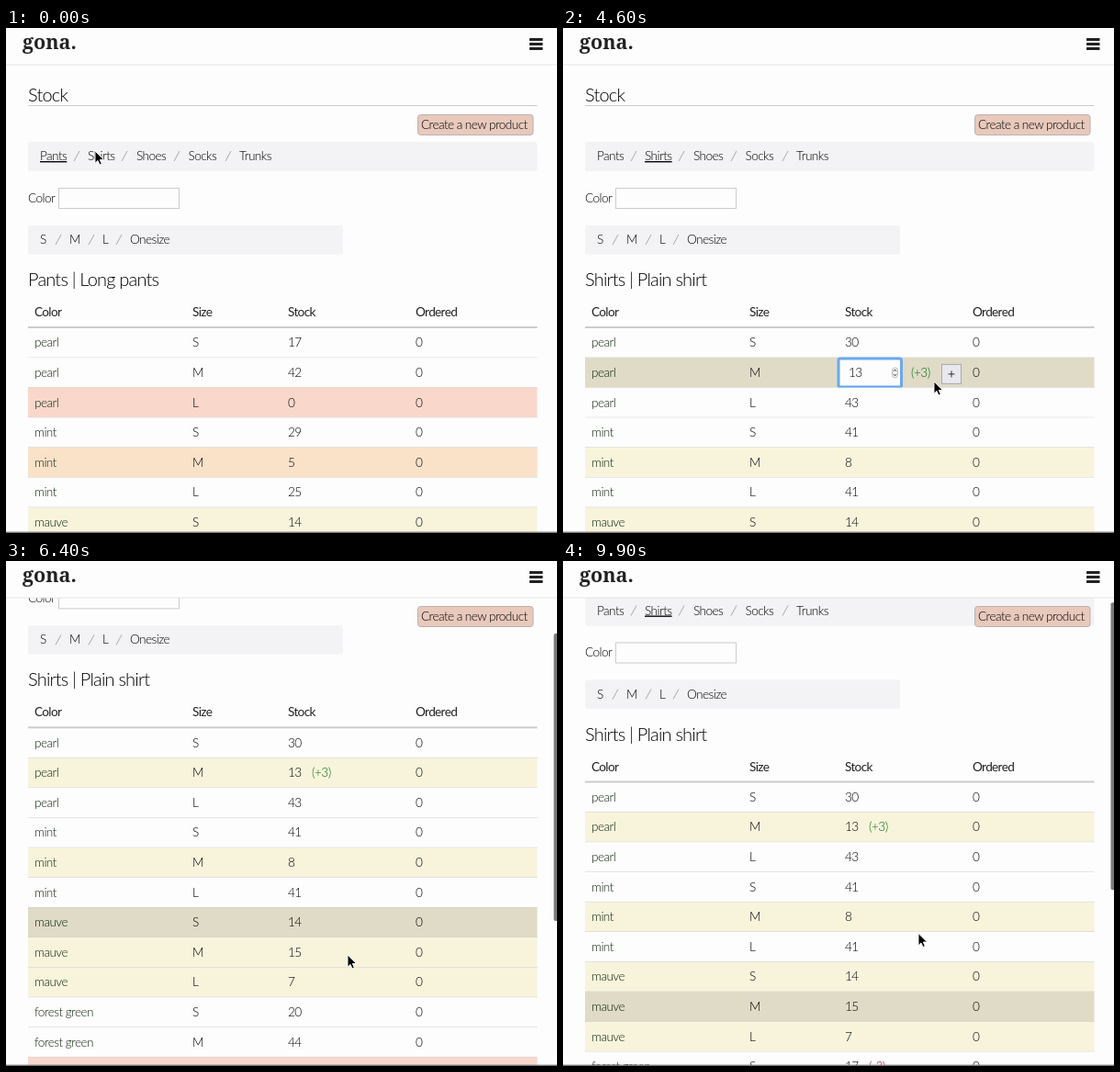
An HTML page for the animation above (10000 ms loop, 600 px wide and 550 px high).

```html
<!DOCTYPE html>
<html lang="en">
<head>
<meta charset="utf-8">
<title>Stock</title>
<style>
  html, body { margin: 0; width: 100%; height: 100%; overflow: hidden; background: #fefdfe; }
  svg { display: block; }
  text { font: 300 13.6px Lato, "Open Sans", sans-serif; letter-spacing: -.55px; fill: #000; white-space: pre; }
  .big { font-size: 20px; letter-spacing: -.8px; }
  .head { font-weight: 400; fill: #222; letter-spacing: -.65px; }
  .name { fill: #0c240c; }
  .on { text-decoration: underline; }
  .up { fill: #006a08; }
  .down { fill: #c00000; }
  .logo { font: 900 21.5px "Noto Serif", serif; letter-spacing: 0; fill: #222; }
</style>
</head>
<body>
<svg id="stage" width="600" height="550" viewBox="0 0 600 550"></svg>
<script>
const LOOP = 10000, STEP = 100;
const ROW_TOP = 326.5, ROW_H = 32.6;
const COLORS = ['pearl', 'mint', 'mauve', 'forest green'];
const SIZES = ['S', 'M', 'L'];
const PANTS = [17, 42, 0, 29, 5, 25, 14, 20, 31, 18, 22, 9];
const SHIRTS = [30, 10, 43, 41, 8, 41, 14, 15, 7, 20, 44, 0];

// [time, value...]
const SCROLL = [[5500, 0], [6000, 103.5], [6100, 103.5], [6600, 152.5], [9400, 152.5], [9900, 85.5]];
const POINTER = [
  [400, 97, 134], [800, 101, 152], [1600, 101, 152], [2200, 321, 376],
  [2300, 321, 376], [2500, 321, 380], [2900, 321, 380], [3100, 361, 373],
  [4300, 361, 373], [4600, 404, 385], [4900, 424, 376], [5100, 424, 376],
  [5400, 372, 429], [6600, 372, 429], [7100, 316, 482], [7500, 316, 482],
  [7700, 361, 480], [8400, 361, 480], [8700, 417, 484], [8900, 417, 484], [9400, 387, 405.5]
];
const SHAPES = [[0, 'arrow'], [2200, 'beam'], [3100, 'arrow'], [4800, 'hand'], [5200, 'arrow'],
  [7100, 'beam'], [7600, 'arrow'], [8600, 'hand'], [9000, 'arrow']];
const EDITS = [
  { row: 1, open: 2700, focus: 3400, ticks: [3700, 3900, 4100], press: 5100, save: 5200, sign: 1 },
  { row: 9, open: 7400, focus: 7800, ticks: [8000, 8200, 8400], press: 8700, save: 8900, sign: -1 }
];

const stage = document.getElementById('stage');

function track(keys, t) {
  const i = keys.findIndex(k => k[0] > t);
  if (i === 0) return keys[0].slice(1);
  if (i < 0) return keys[keys.length - 1].slice(1);
  const a = keys[i - 1], b = keys[i];
  const u = 1 - (1 - (t - a[0]) / (b[0] - a[0])) ** 2;
  return a.slice(1).map((v, n) => v + (b[n + 1] - v) * u);
}

const text = (x, y, s, cls = '') => `<text x="${x}" y="${y}" class="${cls}">${s}</text>`;
const rect = (x, y, w, h, fill, more = '') =>
  `<rect x="${x}" y="${y}" width="${w}" height="${h}" fill="${fill}" ${more}/>`;
const path = (d, more) => `<path d="${d}" ${more}/>`;
const slash = (x, y) => path(`M${x - 3} ${y + 5}l6 -11`, 'stroke="#aaa" fill="none"');

function rowFill(stock, hover) {
  if (stock === 0) return hover ? '#e0bfb3' : '#f9d8cb';
  if (stock <= 5) return hover ? '#e1cab2' : '#fae2c9';
  if (stock <= 15) return hover ? '#dfdbc6' : '#f8f4dc';
  return hover ? '#f2f1f4' : '#fefdfe';
}

function editor(y, value, delta, label, focused, pressed) {
  const bx = delta > 0 ? 412.5 : delta < 0 ? 407.5 : 374;
  let out = rect(300.5, y - 15, 67, 30, '#fefdfe', 'stroke="#ccc"');
  if (focused) {
    out += rect(300, y - 15.5, 68.5, 31, 'none', 'stroke="#6ba8ee" stroke-width="3" rx="2"')
      + rect(358.5, y - 5.5, 6, 11, '#f6f6f6', 'stroke="#bbb" rx="3"')
      + path(`M360 ${y - 1.5}l1.5 -2 1.5 2M360 ${y + 1.5}l1.5 2 1.5 -2`, 'stroke="#444" fill="none"');
  }
  return out + text(311, y + 5, value) + label(379)
    + rect(bx, y - 9, 21, 21, pressed ? '#a09fa2' : '#e9e8ee', `stroke="${pressed ? '#999' : '#aaa'}"`)
    + path(`M${bx + 7} ${y + 1.5}h7m-3.5 -3.5v7`, 'stroke="#333" fill="none"');
}

function table(t, hover) {
  const stocks = t < 1300 ? PANTS : SHIRTS;
  let out = '';
  stocks.forEach((base, i) => {
    const top = ROW_TOP + i * ROW_H, mid = top + ROW_H / 2, y = mid + 4.5;
    const edit = EDITS.find(e => e.row === i && t >= e.open);
    const editing = edit && t < edit.save;
    const delta = edit ? edit.sign * edit.ticks.filter(k => t >= k).length : 0;
    const value = base + delta;
    const label = x => delta
      ? text(x, y, `(${delta > 0 ? '+' : ''}${delta})`, delta > 0 ? 'up' : 'down') : '';
    out += rect(24, top, 554.5, ROW_H, rowFill(editing ? base : value, i === hover))
      + rect(24, top + ROW_H - .5, 554.5, 1, '#d0cfd2')
      + text(31, y, COLORS[Math.floor(i / 3)], 'name') + text(203, y, SIZES[i % 3]) + text(446, y, 0);
    out += editing
      ? editor(mid, value, delta, label, t >= edit.focus && t < edit.press, t >= edit.press)
      : text(307, y, value) + label(333);
  });
  return out + rect(24, 325, 554.5, 2, '#ccc');
}

function page(t, hover) {
  const shirts = t >= 1300;
  const nav = [[37, 'Pants'], [89, 'Shirts'], [142, 'Shoes'], [198.5, 'Socks'], [254, 'Trunks']];
  const sizes = [[37, 'S'], [69, 'M'], [105, 'L'], [135, 'Onesize']];
  return text(24, 80, 'Stock', 'big') + rect(24, 84, 554.5, 1, '#ccc')
    + rect(24, 124, 554.5, 32, '#f3f2f4', 'rx="3"')
    + nav.map(([x, s], i) => text(x, 144, s, i === +shirts ? 'on' : '')).join('')
    + [77, 129, 186, 242].map(x => slash(x, 140)).join('')
    + text(24, 189.5, 'Color') + rect(57.5, 174.5, 131, 22, '#fefdfe', 'stroke="#ccc"')
    + rect(24, 215, 343, 31.5, '#f3f2f4', 'rx="3"')
    + sizes.map(([x, s]) => text(x, 235, s)).join('')
    + [57, 93, 123].map(x => slash(x, 231)).join('')
    + text(24, 281, shirts ? 'Shirts | Plain shirt' : 'Pants | Long pants', 'big')
    + [[31, 'Color'], [203, 'Size'], [307, 'Stock'], [446, 'Ordered']]
      .map(([x, s]) => text(x, 314, s, 'head')).join('')
    + table(t, hover);
}

function header() {
  return rect(0, 0, 600, 40, '#fefdfe') + rect(0, 39.5, 600, 1, '#e6e5e8')
    + text(18, 23, 'gona.', 'logo')
    + [11, 16, 21].map(y => rect(570, y, 14.5, 3, '#222', 'rx=".5"')).join('');
}

function pointer(x, y, shape) {
  const d = {
    arrow: path('M0 0V13.2L3 10.4L5 15L7.3 14L5.3 9.5H9.5Z', 'fill="#000" stroke="#fff" stroke-width=".9"'),
    beam: ['#fff', '#111'].map((c, i) =>
      path('M-3 -7Q0 -7 0 -5V5Q0 7 -3 7M3 -7Q0 -7 0 -5V5Q0 7 3 7M-1.5 1.5h3',
        `fill="none" stroke="${c}" stroke-width="${i ? 1.2 : 2.6}"`)).join(''),
    hand: path('M-2 0Q-.5 -2.5 1 0V5Q2.5 3.5 3.6 5.2Q5 4.2 6 6Q8 5.5 8 7.5V10Q7.5 12 6.3 14H-1Q-2 11 -5 8.2Q-5.5 5.5 -2 8Z',
      'fill="#fff" stroke="#111" stroke-width="1.1"')
  }[shape];
  return `<g transform="translate(${x} ${y})">${d}</g>`;
}

function draw(t) {
  const [scroll] = track(SCROLL, t), [x, y] = track(POINTER, t);
  // Row hover refreshes only once scrolling has settled.
  const settled = t < 6100 ? 0 : t < 6600 ? 103.5 : 152.5;
  const hover = Math.floor((y + settled - ROW_TOP) / ROW_H);
  const by = Math.max(49.5, 94.5 - scroll);
  const scrolling = t >= 5600 && t < 6900 || t >= 9500;
  stage.innerHTML = rect(0, 0, 600, 550, '#fefdfe')
    + `<g transform="translate(0 ${-scroll})">${page(t, hover)}</g>`
    + rect(448.5, by, 125.5, 22, '#e8c9bc', 'stroke="#bcb0ae" rx="3"')
    + text(452, by + 15, 'Create a new product')
    + header()
    + (scrolling ? rect(596.5, .57 * scroll - 3.5, 5, 313, '#7b7a7c', 'rx="2"') : '')
    + rect(0, 548.6, 600, 1.4, '#777')
    + pointer(x, y, SHAPES.filter(s => s[0] <= t).pop()[1]);
}

const start = performance.now();
let last = -1;
function tick() {
  const t = Math.floor((performance.now() - start) % LOOP / STEP) * STEP;
  if (t !== last) draw(last = t);
  requestAnimationFrame(tick);
}
tick();
</script>
</body>
</html>
```
